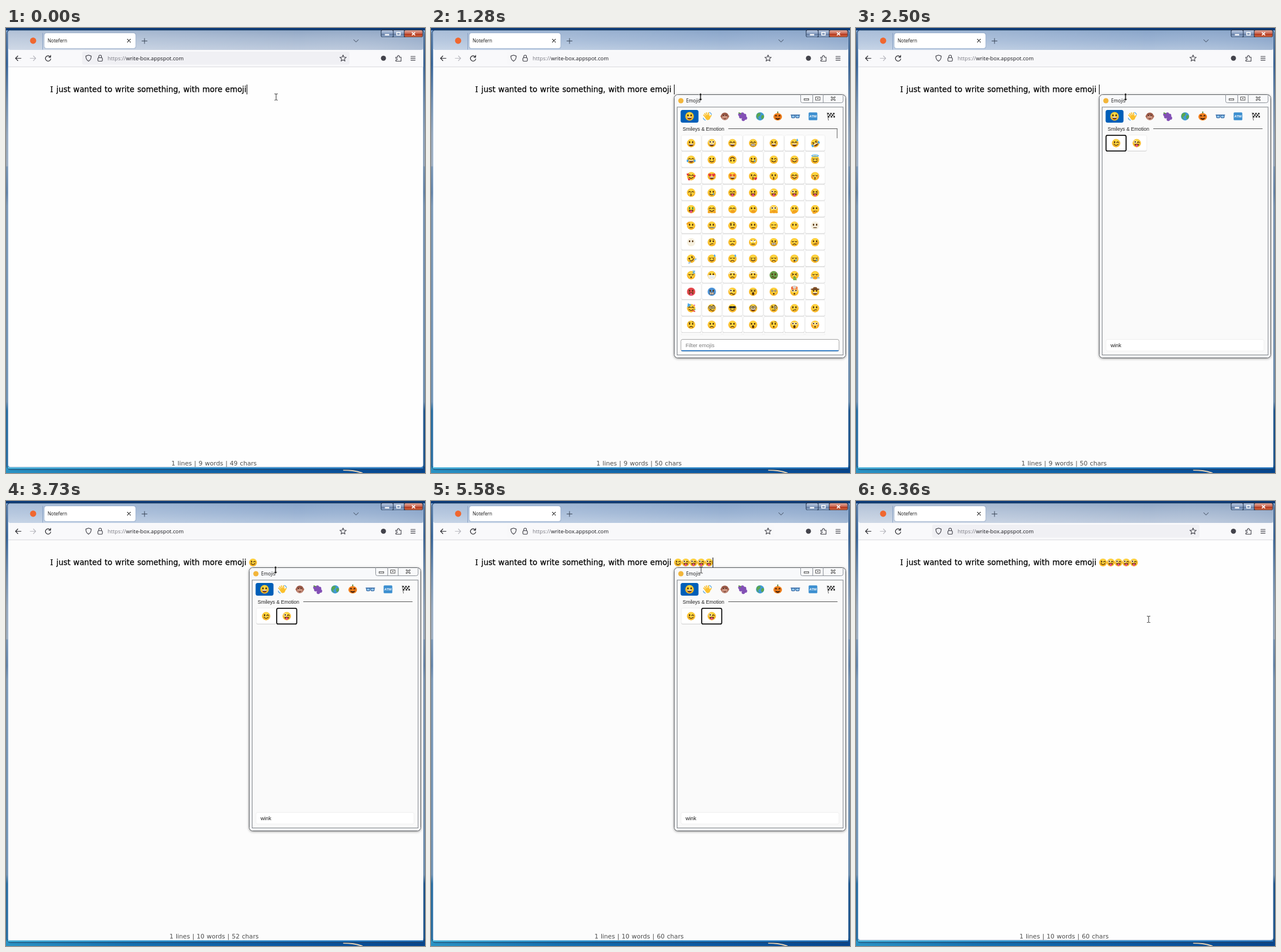
An HTML page for the animation above (6.38 s loop, 726 px wide and 771 px high).

```html
<!DOCTYPE html>
<html lang="en">
<head>
<meta charset="utf-8">
<title>Emoji picker</title>
<style>
html, body { margin: 0; width: 100%; height: 100%; overflow: hidden; background: #0f5c9c; }
svg { display: block; }
.ui { font-family: "Open Sans", sans-serif; }
.page { font-family: "DejaVu Sans", sans-serif; }
.cap { font-family: "Noto Sans", sans-serif; }
.app { font-family: "Liberation Sans", Arial, sans-serif; }
</style>
</head>
<body>
<svg id="stage" width="726" height="771" viewBox="0 0 726 771"></svg>
<script>
const LOOP = 6380;
const INK = '#56330f', PINK = '#f0528a', RED = '#e5353f', SEA = '#4aa8e8', HAND = '#f5a623';

// Shape helpers
const circ = (x, y, r, f, more = '') => `<circle cx="${x}" cy="${y}" r="${r}" fill="${f}" ${more}/>`;
const oval = (x, y, a, b, f = INK, more = '') => `<ellipse cx="${x}" cy="${y}" rx="${a}" ry="${b}" fill="${f}" ${more}/>`;
const rect = (x, y, w, h, f, r = 0, more = '') => `<rect x="${x}" y="${y}" width="${w}" height="${h}" fill="${f}" rx="${r}" ${more}/>`;
const fill = (d, f = INK) => `<path d="${d}" fill="${f}"/>`;
const line = (d, s = INK, w = 1.7, more = '') => `<path d="${d}" fill="none" stroke="${s}" stroke-width="${w}" stroke-linecap="round" stroke-linejoin="round" ${more}/>`;
const text = (x, y, s, size, cls, f = '#111', more = '') => `<text x="${x}" y="${y}" font-size="${size}" class="${cls}" fill="${f}" ${more}>${s}</text>`;
const at = (x, y, k, body) => `<g transform="translate(${x} ${y}) scale(${k})">${body}</g>`;
const group = (id, body, more = '') => `<g id="${id}" ${more}>${body}</g>`;
const heart = (x, y, k, f = RED) => at(x, y, k, fill('M0 5C-8 -1 -4 -7 0 -3C4 -7 8 -1 0 5z', f));
const both = f => f(-1) + f(1);

// A face is written as eyes, mouth, then any number of extras.
const SKIN = { r: '#e5484d', e: '#4b93d8', n: '#6a9f4a', v: '#8a62c4', w: '#f5efdf' };
const PAIRS = { w: 'o^', z: 'Oo', m: 'oG', j: 'O^' };
const EYES = {
  o: x => oval(x, -2.2, 1.8, 2.5),
  '^': x => line(`M${x - 2.3} -1.2q2.3 -3.8 4.6 0`, INK, 1.9),
  v: x => line(`M${x - 2} -2q2 3 4 0`),
  '-': x => line(`M${x - 2} -2h4`),
  x: x => { const s = x < 0 ? 1 : -1; return line(`M${x - 1.8 * s} -4l${3.6 * s} 2l${-3.6 * s} 2`); },
  h: x => heart(x * 1.2, -2.5, .85),
  s: x => fill(`M${x * 1.1} -7l1.3 3l3.2 .3l-2.4 2.1l.7 3.2l-2.8 -1.7l-2.8 1.7l.7 -3.2l-2.4 -2.1l3.2 -.3z`, '#e8542a'),
  O: x => circ(x, -2.8, 3.2, '#fff') + circ(x, -2.8, 1.9, INK),
  u: x => circ(x, -2.5, 2.9, '#fff') + circ(x, -4.2, 1.3, INK),
  '@': x => circ(x, -2, 2.2, '#fff', `stroke="${INK}"`) + circ(x, -2, .8, INK),
  X: x => line(`M${x - 1.7} -4l3.4 3.6m0 -3.6l-3.4 3.6`),
  $: x => rect(x - 1.6, -5, 3.2, 5.6, '#3d8b45', 1),
  g: x => rect(x - 4, -5, 8, 5.4, '#222', 2),
  G: x => circ(x, -2, 3.6, '#fff8', 'stroke="#333" stroke-width="1.3"') + circ(x, -2, 1.4, INK)
};
const GRIN = fill('M-5.6 1.6h11.2a5.6 5.6 0 0 1 -11.2 0z', '#713b17');
const MOUTHS = {
  D: GRIN + fill('M-5 1.6h10v1.8h-10z', '#fff'),
  s: line('M-5 2.6q5 5.4 10 0', INK, 1.9),
  f: line('M-4 6q4 -4 8 0'),
  '-': line('M-3.5 4.7h7'),
  o: oval(0, 4.8, 1.8, 2.2),
  O: oval(0, 4.6, 2.8, 3.7),
  k: line('M-1 2.2q3 1.2 0 2.6q3 1.2 0 2.6'),
  t: GRIN + fill('M-2.4 3.8q2.4 -1.6 4.8 0v3.600q-2.4 4 -4.800 0z'.replace(/00/g, ''), PINK),
  g: rect(-5, 1.6, 10, 5, '#fff', 2, `stroke="${INK}"`) + line('M-5 4.1h10M0 1.6v5', INK, .7),
  '/': line('M-3.5 5.5q4 -3 7 -1.5'),
  z: line('M-6 4.5h12', '#6b7c88', 2.2) + circ(6, 4.5, 1.6, '#9aa8b2'),
  y: line('M-5 5q2.5 -3 5 0t5 0'),
  m: fill('M-9 0Q0 -1 9 0Q9 9 0 9.8Q-9 9 -9 0z', '#f4f6f8') + line('M-6 3.5h12M-5 6h10', '#c8d3da', .8),
  h: oval(1, 5.8, 5.4, 3.8, HAND) + line('M-3 4.5h7', '#d98717', 1),
  n: ''
};
const EXTRAS = {
  t: both(s => oval(s * 8.5, 2.8, 2.3, 3.2, SEA)),
  d: fill('M6.5 -11q5 6 .5 6.6q-4 -.6 -.5 -6.6z', SEA),
  l: oval(4, 3.5, 1.4, 2.6, SEA),
  b: both(s => circ(s * 6.4, 2, 2.3, '#f2665488')),
  H: oval(0, -9.5, 8, 2, 'none', `stroke="${SEA}" stroke-width="1.8"`),
  h: heart(-8, -4, .6) + heart(8, 0, .6) + heart(-5, 8, .6),
  k: heart(6, 6, .75),
  c: fill('M-5 -6Q-5 -13 0 -11Q5 -13 5 -6z', '#8a5a33') + oval(0, -6, 11, 2.2, '#6f4526'),
  p: fill('M-9 -2L-8 -12L1 -8z', SEA) + circ(8, -7, 1.6, PINK) + circ(9, 3, 1.4, '#49ad5a') + line('M3 5l6 3', RED, 2),
  i: fill('M-9.6 -4Q0 -13 9.6 -4L8 -3Q0 -8 -8 -3z', '#f1ede4'),
  a: both(s => oval(s * 6.6, 7, 3.4, 2.8, HAND)),
  q: oval(-2, 8.4, 4.4, 2.6, HAND) + line('M1 8V3', HAND, 2),
  S: oval(-7, -6, 5, 2.4, HAND, 'transform="rotate(-35 -7 -6)"'),
  Z: line('M4 -10h5l-5 5h5', SEA, 1.8),
  B: line('M-5.5 -5.8l3.6 .6M2 -7q2 -1.4 4 .4', INK, 1.2),
  C: both(s => fill(`M${s * 9} -11V-2L${s * 2} -8.6z`, '#f2b52b')) + both(s => line(`M${s * 7} 2l${s * 5} -.6`, INK, .7)),
  J: circ(-4, -9, 4, '#f26a3d') + circ(4, -9, 4, '#f5864a') + circ(0, -11, 4, '#d9d3cc'),
  V: fill('M-3 4h6l3 8h-9z', '#7bb342'),
  N: oval(4, 2, 5, 1.6, '#dd8b22'),
  I: both(s => fill(`M${s * 5} -8L${s * 10} -12V-3z`, '#7750b5')),
  f: both(s => oval(s * 8, 6.5, 3.6, 1.9, '#9fc4e4')),
  F: fill('M-9.4 -3.4A10 10 0 0 1 9.4 -3.4Q0 -1 -9.4 -3.4z', '#5b9fe080')
};

function face(code) {
  const [eyes, mouth, ...extra] = code;
  const [left, right] = PAIRS[eyes] || eyes + eyes;
  const skin = SKIN[extra.find(k => SKIN[k])] || 'url(#skin)';
  const turn = extra.includes('U') ? 180 : extra.includes('T') ? -30 : 0;
  return `<g transform="rotate(${turn})">` + circ(0, 0, 10, skin) + EYES[left](-3.7) + EYES[right](3.7) +
    MOUTHS[mouth] + extra.map(k => EXTRAS[k] || '').join('') + '</g>';
}

// Other pictures are written as name:colour:colour.
const person = (hair, shirt) => circ(0, -3, 7, hair) + circ(0, -1.5, 5, '#fbc94a') + fill('M-9 10Q-8 4 0 4Q8 4 9 10z', shirt) +
  both(s => circ(s * 1.9, -2, .9, INK)) + line('M-1.5 1.3h3', INK, 1);
const walker = (shirt, legs) => circ(-1, -8, 2.4, '#7a4a28') + line('M-1 -4v6', shirt, 4) +
  line('M-1 2l-3 8M-1 2l3 8', legs, 2.4) + line('M1 -2l4 2', '#fbc94a', 1.8) + line('M5 0l4 9', '#aaa', 1);
const waves = fill('M-10 4q3 -3 6 0t7 0t7 0v6h-20z', '#3d9be0');
const PICS = {
  hand: f => oval(0, 3, 5.5, 6, f) + [-5, -2, 1.5, 5].map((x, i) => line(`M${x * .8} 2L${x * 1.2} ${-6 - (i % 3 ? 2 : 0)}`, f, 2.5)).join('') + line('M4 5l5 -3', f, 2.6),
  snap: f => oval(1, 3, 6, 5, f) + line('M-1 2l-3 -9M-4 1l2 -4', f, 3),
  ear: f => oval(0, 0, 6.5, 9, f) + circ(-3, -3, 5, '#87a3bd') + line('M-1 -4q5 0 2 7', '#c77f1d', 1.6),
  person, walker,
  bride: shirt => oval(0, 0, 9, 10, '#e6e6ec') + person('#b87536', shirt),
  duo: () => both(s => at(s * 5, 0, 1, circ(0, -5, 3, '#fbc94a') + line('M0 0v5', '#222', 5) + line('M-2 6v4M2 6v4', '#fbc94a', 1.5) + line('M-2 -8v-3M2 -8v-3', '#333', 1.5))),
  row: f => circ(-1, -5, 2.8, '#8b5a2b') + line('M-1 -1v4', f, 4.5) + line('M-6 -3l14 9', '#8d6239', 1.5) + fill('M-10 2h20l-4 5h-13z', '#a9653a') + waves,
  swim: f => circ(-2, -1, 3.2, '#fbc94a') + line('M1 -5l6 5', '#fbc94a', 2.5) + fill('M-5 -2a3 3 0 0 1 6 0z', f) + waves,
  love: () => rect(-10, -10, 20, 20, '#fbd3d8', 3) + both(s => circ(s * 5, 1, 4, '#f7b93c') + rect(s * 5 - 4, 5, 8, 5, '#d9486a', 1)) + heart(0, -5, .8),
  pair: () => rect(-10, -10, 20, 20, '#e04a44', 3) + both(s => circ(s * 5, -2, 4.2, '#f7b93c')) + heart(0, -6, .6, '#fff'),
  heart: f => heart(0, 1, 1.7, f),
  shot: () => heart(0, 1, 1.6) + line('M-9 8L9 -8', '#5b9ee0', 1.8),
  gift: () => heart(0, 1, 1.7) + line('M-7 -2q7 4 14 -2M0 0v9', '#f6c344', 2),
  wine: () => fill('M-5 -9h10q1 9 -5 9q-6 0 -5 -9z', '#a3324a') + line('M0 0v8M-4 9h8', '#9db2c0', 1.5),
  pane: () => rect(-8, -9, 16, 18, '#9ed2f2', 1, 'stroke="#8a6a50" stroke-width="2"') + line('M0 -9v18M-8 0h16', '#8a6a50', 1.5),
  wave: () => `<g transform="rotate(-25)">${PICS.hand('#fbc02d')}</g>` + line('M5 -9q4 1 5 5M-9 4q1 4 5 5', '#5aa7e0', 1.6),
  ape: () => both(s => circ(s * 7.5, 0, 2.8, '#c98a72')) + circ(0, 0, 8.8, '#9a5a48') + oval(0, 3, 6.5, 5.5, '#cf9580') + both(s => circ(s * 2.8, -2, 1.3, '#2d1b16')) + line('M-2.5 5q2.5 2 5 0', '#6b372b'),
  grapes: () => [[-6, -4], [0, -5], [5, -2], [-4, 1], [2, 2], [7, 4], [2, 7]].map(([x, y]) => circ(x, y, 3.9, '#8350b5')).join('') + line('M-8 -8l4 2', '#5b9b3e', 2.5),
  globe: () => circ(0, 0, 9.5, '#3f9ad6') + fill('M-7 -6Q-1 -10 2 -6L-1 -1L-5 2L-2 8Q-10 4 -8 -3zM4 -3L9 -2Q10 4 4 7L2 2z', '#5aa650'),
  pumpkin: () => line('M0 -6v-4', '#588438', 2.5) + oval(0, 1, 10, 8.5, '#f07f1d') + both(s => fill(`M${s * 4} -4l3 4h-6z`, '#4a240d')) + fill('M-6 3q6 3 12 0q-2 5 -6 5t-6 -5z', '#4a240d'),
  specs: () => both(s => rect(s * 5 - 4, -3, 8, 6.5, '#8fc6ee', 3, 'stroke="#3b6ea8" stroke-width="1.6"')) + line('M-10 -3h20', '#3b6ea8', 2),
  sign: () => rect(-10, -9, 20, 18, '#3c8fd0', 2) + text(0, 3, 'ATM', 8, 'app', '#fff', 'text-anchor="middle" font-weight="700"'),
  flag: () => line('M-8 -8l3 17', '#777', 1.6) + Array.from({ length: 15 }, (_, i) => rect(-7 + i % 5 * 3.2 + (i / 5 | 0) * .5, -8 + (i / 5 | 0) * 3.6, 3.2, 3.6, i % 2 ? '#ddd' : '#222')).join('')
};
const emoji = code => {
  const [name, ...args] = code.split(':');
  return PICS[name] ? PICS[name](...args) : face(code);
};

// Picker contents
const SMILE = 'Smileys &amp; Emotion', PEOPLE = 'People &amp; Body';
const ALL = `oD OD ^D ^g xD ^Dd xDtT ^Dt os osU osl ws ^sb vsH ^sh hD sD wkk ok ^sb vkb
  ^k osl ^t ot jt zt xt $t ^sa ^h oh Oha ohq o-q o-S oz o-B o- -- on o-w
  onw o/B -f u- og vf o-N osTf vsd vfd vs vf vol vsl voZ om ofi o-i oyn xoV vhf
  otr oge zy XO @o OoJ oDc ^sp GyB gs GD m-B o/ o/ ofB of of oO ooB OO Oob
  of of of of of of of`;
const SOME = `OD ^D ^g ^Dd ^Dt ws ^sb vsH ^sh hD wkk vkb ^k osl ot jt xt ^sa ^h oh Oha
  o-B on u- om ofi o-i XO @o gs m-B o/ oO of ofdF vfd xff xgr osvI ofvI ^DC ^DtC
  hDC o/C shot: gift: heart:#f0618f`;
const FOLK = `hand:#fbc02d snap:#fbc02d ear:#f7b93c person:#d9632b:#e5484d person:#c9702f:#3d8fd0 person:#7a4fb0:#f0a32a person:#c9c9cf:#6a9fd0
  person:#3a3a3a:#c0392b person:#7a4fb0:#7a4fb0 bride:#fff bride:#dde bride:#f3a13a walker:#e08a2c:#333 walker:#e8702c:#3572b0
  walker:#3aa0a8:#333 walker:#49a24a:#333 walker:#8a5fc0:#333 walker:#4a70c0:#333 duo: duo: duo:
  row:#e5484d row:#3d8fd0 row:#8a5fc0 swim:#f5a623 swim:#f5d323 swim:#e5486d love: pair: pair: pair:`;
const LISTS = {
  all: [[SMILE, ALL]],
  wi: [[SMILE, SOME], [PEOPLE, FOLK]],
  win: [[SMILE, 'xff ws'], ['Food &amp; Drink', 'wine:'], ['Travel &amp; Places', 'pane:']],
  wink: [[SMILE, 'ws jt']]
};
const COL = 35.8, ROW = 28.6;

function cells(codes, top) {
  return codes.split(/\s+/).map((code, i) => {
    const x = 433.5 + i % 7 * COL, y = top + Math.floor(i / 7) * ROW;
    return rect(x, y + .8, 34.6, 27.4, '#c9c9c9', 3) + rect(x, y, 34.6, 27.2, '#fff', 3, 'stroke="#ececec" stroke-width=".8"') +
      at(x + 17.2, y + 14, .72, emoji(code));
  }).join('');
}

function list(name) {
  let y = 174.5, out = '';
  for (const [title, codes] of LISTS[name]) {
    const size = title.replace('&amp;', '&').length;
    out += text(436, y + 3.2, title, 8.6, 'app', '#222') + line(`M${453.8 + size * 3.63} ${y}H704`, '#555', 1) + cells(codes, y + 11);
    y += Math.ceil(codes.split(/\s+/).length / 7) * ROW + 21.3;
  }
  return group('list-' + name, out, 'clip-path="url(#grid)"');
}

const DOWN = 'x2="0" y2="1"';
const grad = (id, stops, dir = DOWN) => `<linearGradient id="${id}" ${dir}>` +
  stops.map(([o, c]) => `<stop offset="${o}" stop-color="${c}"/>`).join('') + '</linearGradient>';
const side = low => [[0, '#7fa3cf'], [.08, '#3f78b8'], [.17, '#a9c6e4'], [.24, '#e4edf7'], [.31, '#f2f7fc'], [.312, '#b5d0ea'],
  [.37, '#8fb2d8'], [.4, '#b9d4ee'], [.84, '#a5cbea'], [.86, low], [1, low]];

const defs = `<defs>
  <radialGradient id="skin" cy=".4"><stop offset=".5" stop-color="#ffd840"/><stop offset="1" stop-color="#f8b526"/></radialGradient>
  <clipPath id="grid"><rect x="426" y="165" width="288" height="366.5"/></clipPath>` +
  grad('left', side('#2b8ccb')) + grad('right', side('#0f62ae')) +
  grad('floor', [[0, '#2a93c4'], [.3, '#1470b0'], [.7, '#0a56a0'], [1, '#06458c']], '') +
  grad('rim', [[0, '#57c3e6'], [.4, '#37a0d8'], [1, '#2f7fc6']], '') +
  grad('glassOn', [[0, '#94a9c6'], [.4, '#a6b8d1'], [1, '#bdcadd']]) +
  grad('glassOff', [[0, '#8ba6ca'], [.5, '#9bb3d3'], [1, '#b1c4dd']]) +
  grad('sheen', [[0, '#ffffff48'], [.35, '#ffffff28'], [.7, '#ffffff00'], [1, '#5f80ad28']], '') +
  grad('btn', [[0, '#b5c4dc'], [.48, '#8ea4c6'], [.5, '#62799f'], [1, '#8fa9cb']]) +
  grad('shut', [[0, '#e0a597'], [.48, '#cc6a55'], [.5, '#b1331c'], [1, '#d0663f']]) + '</defs>';

const frame = rect(0, 0, 363, 771, 'url(#left)') + rect(363, 0, 363, 771, 'url(#right)') +
  rect(0, 0, 726, 4, '#0b3a78') + rect(0, 760, 726, 11, 'url(#floor)') +
  line('M585 766q18 0 32 5', '#e9d3b4', 2) +
  rect(1.5, 3.5, 723, 761.5, 'none', 6, 'stroke="#27405f"') + rect(3, 761, 720, 2.2, 'url(#rim)') +
  rect(3.5, 4.5, 719.5, 756.5, '#fefefe', 4, 'stroke="#6f93bb" stroke-width=".8"') + rect(4, 5, 719, 33, 'url(#glassOn)', 4) +
  group('blur', rect(4, 67, 719, 694, '#fcfcfc') + rect(4, 5, 719, 33, 'url(#glassOff)', 4)) +
  rect(4, 5, 719, 33, 'url(#sheen)', 4);

const tabs = circ(47, 22, 5.4, '#f0672f') + line('M63.5 9V37', '#8aa2c5', 1) +
  rect(65.5, 8.5, 160, 27.5, '#5f7da844', 4) + rect(66.5, 9, 158, 26, '#fff', 4) + text(72, 25.3, 'Notefern', 8.1, 'ui') +
  line('M210.3 19.3l5.4 5.4m0 -5.4l-5.4 5.4', '#222', 1.1) + line('M235.5 22.5h9M240 18v9', '#3a4658', 1) + line('M602.5 20.3l4 4l4 -4', '#3a4658', 1) +
  rect(649.5, 2.5, 73, 13.5, '#22344f', 3) + rect(650.5, 4, 20, 11.5, 'url(#btn)', 2) + rect(671.5, 4, 18, 11.5, 'url(#btn)') + rect(690.5, 4, 31, 11.5, 'url(#shut)', 2) +
  rect(656.5, 10.5, 7.5, 2.4, '#fff') + rect(677, 7.8, 6, 4.4, 'none', 0, 'stroke="#fff" stroke-width="1.5"') + line('M703.8 7.8l4.6 4.4m0 -4.4l-4.6 4.4', '#fff', 1.6);

const star = Array.from({ length: 10 }, (_, i) => {
  const a = i * Math.PI / 5 - Math.PI / 2, r = i % 2 ? 2.6 : 5.8;
  return (584 + r * Math.cos(a)).toFixed(1) + ' ' + (52.6 + r * Math.sin(a)).toFixed(1);
}).join('L');
const GRAY = '#43434b';
const bar = rect(4, 38, 719, 29, '#f9f9fb') + rect(132, 41, 463, 22.5, '#f0f0f4', 3, 'id="field"') + line('M4.5 67.3H722.5', '#d4d4d9', .9) +
  line('M26 52.5H16.5m4 -4l-4 4l4 4', '#2b2b30', 1.2) + line('M42 52.5h9.5m-4 -4l4 4l-4 4', '#b9b9bf', 1.2) +
  line('M76.6 50a4.6 4.6 0 1 0 .9 3.5M77.4 47.4v3.2h-3.2', '#2b2b30', 1.2) +
  line('M143 47l4.6 1.6q.3 6 -4.6 9q-4.9 -3 -4.6 -9z', GRAY, 1.2) +
  rect(159.2, 51.5, 7.8, 6, 'none', 1.5, `stroke="${GRAY}" stroke-width="1.2"`) + line('M160.8 51.3v-2a2.3 2.3 0 0 1 4.6 0v2', GRAY, 1.2) +
  text(176, 56.3, 'https://<tspan fill="#17171c">write-box.appspot.com</tspan>', 9.3, 'ui', '#7b7b84') +
  line(`M${star}z`, GRAY, 1.1) + circ(654, 52.3, 4.4, GRAY) +
  line('M675.5 50.5h3v-1.5a1.5 1.5 0 0 1 3 0v1.5h3v7h-9v-2.3h1.3a1.2 1.2 0 0 0 0 -2.4h-1.3z', GRAY, 1.1) +
  line('M701.5 49.2h7.5m-7.5 3.2h7.5m-7.5 3.2h7.5', GRAY, 1.1);

const BOLDER = 'stroke="#000" stroke-width=".25"';
const doc = text(76.8, 111, 'I', 14, 'cap', '#000', BOLDER) +
  text(87.3, 111, 'just wanted to write something, with more emoji', 13.37, 'page', '#000', 'word-spacing=".55" ' + BOLDER) +
  ['ws', 'jt', 'jt', 'jt', 'jt'].map((code, i) => group('typed' + i, at(428 + i * 13.4, 106.5, .68, emoji(code)))).join('') +
  rect(0, 98, 1, 17, '#000', 0, 'id="caret"') +
  text(360.5, 758, '', 10.7, 'page', '#4c4c4c', 'id="status" text-anchor="middle" word-spacing=".55"');

const heads = ['oD', 'wave:', 'ape:', 'grapes:', 'globe:', 'pumpkin:', 'specs:', 'sign:', 'flag:'];
const cross = 'M694 119.8l5.6 5m0 -5l-5.6 5';
const popup = rect(421.5, 115.5, 297, 456, '#f8f9fb', 6, 'stroke="#575b60" style="filter:drop-shadow(0 1px 2px #0006)"') +
  rect(422.5, 116.5, 295, 454, 'none', 5, 'stroke="#fff"') +
  circ(433, 126, 4.6, '#f2b53a') + text(442, 129, 'Emojis', 8.1, 'ui') +
  line('M640.5 115.5v11q0 3 3 3h67q3.5 0 3.5 -3v-11M661.5 115.5v14M679.5 115.5v14', '#8b9097', 1) +
  rect(646.5, 122.5, 8, 2.5, '#fff', 0, 'stroke="#555"') + rect(666.5, 119.5, 7.5, 5.5, '#fff', 0, 'stroke="#555"') + rect(669, 121.5, 2.5, 1.5, '#555') +
  line(cross, '#555', 2.6) + line(cross, '#fff', 1) +
  rect(426.5, 137, 287.5, 429.5, '#fafafa', 0, 'stroke="#7d8186"') +
  rect(432.5, 142, 31, 22, '#005fb8', 3.5) + heads.map((code, i) => at(448 + i * 30.55, 153, .75, emoji(code))).join('') +
  Object.keys(LISTS).map(list).join('') + rect(703, 175, 1.3, 16, '#858585', 0, 'id="thumb"') +
  rect(433, 185.8, 34.6, 27.4, 'none', 2.5, 'id="ring" stroke="#111" stroke-width="1.8"') +
  rect(433, 539.5, 274, 20.3, '#fff', 3, 'id="box" stroke="#9a9a9a" stroke-width=".9"') +
  line('M434.5 559.3H705.5', '#005fb8', 1.4, 'id="under"') +
  text(441, 553, '', 9.3, 'app', '#1b1b1b', 'id="query"') + rect(0, 544, 1, 11, '#000', 0, 'id="filterCaret"');

const beam = line('M-2.5 -5.5q2 0 2.5 .8q.5 -.8 2.5 -.8M0 -4.7v9.4M-2.5 5.5q2 0 2.5 -.8q.5 .8 2.5 .8', '#444', 1.1);
const sizer = `<path d="M0 -7l3.6 4h-2.4v6h2.4l-3.6 4l-3.6 -4h2.4v-6h-2.4z" fill="#222" stroke="#fff" stroke-width=".8"/>`;

document.getElementById('stage').innerHTML = defs + frame + tabs + bar + doc +
  group('popup', popup) + group('beam', beam) + group('sizer', sizer, 'transform="translate(467 119.5)"');

// Timing
const $ = id => document.getElementById(id);
const set = (id, key, value) => $(id).setAttribute(key, value);
const show = (id, on) => set(id, 'display', on ? 'inline' : 'none');
const ramp = (t, a, b) => Math.min(1, Math.max(0, (t - a) / (b - a)));
const within = (t, spans) => spans.some(([a, b]) => t >= a && t < b);
const INSERTS = [2860, 4050, 4410, 4630, 4720];
const HIDDEN = [[730, 1250], [1790, 2320], [2840, 2860], [3360, 3890], [4950, 5490], [6000, LOOP]];
const QUERY = [[1540, 'w', 448], [1650, 'wi', 450], [1780, 'win', 455.5], [1960, 'wink', 460]];

function draw(t) {
  const count = INSERTS.filter(s => t >= s).length;
  INSERTS.forEach((s, i) => show('typed' + i, t >= s));
  show('caret', !within(t, HIDDEN));
  set('caret', 'x', t < 200 ? 417 : 421 + count * 13.4);
  $('status').textContent = `1 lines | ${count ? 10 : 9} words | ${(t < 290 ? 49 : 50) + 2 * count} chars`;

  const away = t >= 730 && t < 5690;
  show('blur', away);
  set('field', 'fill', away ? '#f8f8fa' : '#f0f0f4');

  const open = ramp(t, 740, 960) * (1 - ramp(t, 5680, 5830));
  const k = .92 + .08 * open;
  show('popup', open > 0);
  set('popup', 'opacity', open);
  set('popup', 'transform', `translate(${570 * (1 - k)} ${343 * (1 - k)}) scale(${k})`);

  const [, word, end] = QUERY.filter(q => t >= q[0]).pop() || [0, '', 441];
  const current = t < 1660 ? 'all' : t < 1790 ? 'wi' : t < 1960 ? 'win' : 'wink';
  Object.keys(LISTS).forEach(name => show('list-' + name, name === current));
  show('thumb', t < 1790);
  set('thumb', 'height', current === 'all' ? 16 : 53);
  $('query').textContent = word || 'Filter emojis';
  set('query', 'fill', word ? '#1b1b1b' : '#7b7b7b');
  show('filterCaret', within(t, [[960, 1280], [1540, 2140]]));
  set('filterCaret', 'x', end);
  show('under', t < 2140);
  set('box', 'stroke', t < 2140 ? '#9a9a9a' : '#eeeeee');
  show('ring', t >= 2500);
  set('ring', 'x', t < 3730 ? 433.3 : 433.3 + COL);

  const sizing = t >= 800 && t < 5540, move = ramp(t, 6270, 6350);
  show('sizer', sizing);
  show('beam', !sizing);
  set('beam', 'transform', `translate(${468 + 39 * move} ${119.5 + 85.5 * move})`);
}

const start = performance.now();
function tick() {
  draw((performance.now() - start) % LOOP);
  requestAnimationFrame(tick);
}
tick();
</script>
</body>
</html>
```
